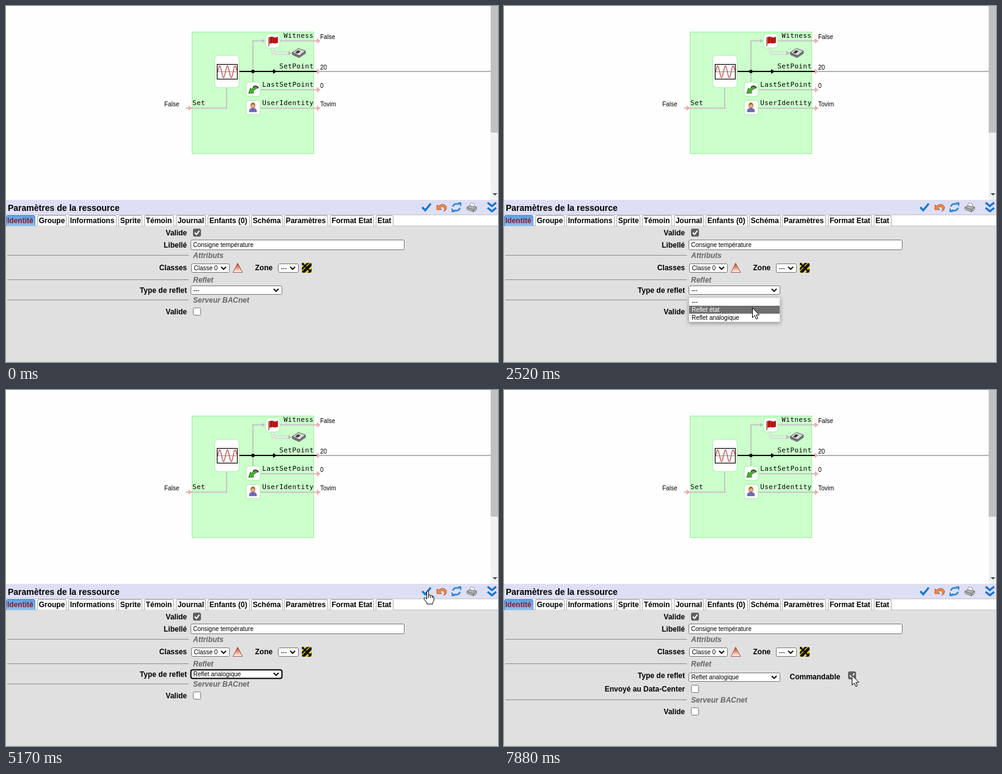
Recreate the animation shown at these times as an HTML page. Size 805 px wide and 582 px high, loop 8000 ms.

```html
<!DOCTYPE html>
<html lang="fr">
<head>
<meta charset="utf-8">
<title>Paramètres de la ressource</title>
<style>
html, body { margin: 0; width: 100%; height: 100%; overflow: hidden; background: #fff; }
svg { display: block; }
text { font: 10px "Liberation Sans", Arial, sans-serif; white-space: pre; }
.b { font-weight: bold; font-size: 12px; }
.i { font-weight: bold; font-style: italic; font-size: 12px; fill: #666; }
.h { font-weight: bold; font-size: 14px; }
.m { font: 11px "DejaVu Sans Mono", monospace; letter-spacing: .38px; }
.wire { fill: none; stroke: #c6c6c6; stroke-width: 2; }
.card { fill: #fff; stroke: #a4f2a4; }
.rule { stroke: #8c8c8c; }
.field { fill: #fff; stroke: #767676; }
.pink { fill: #f4aaa4; }
</style>
</head>
<body>
<svg id="stage" width="805" height="582" viewBox="0 0 805 582">
  <defs>
    <linearGradient id="tab" x2="0" y2="1"><stop stop-color="#5c9fe4"/><stop offset="1" stop-color="#8fc0f0"/></linearGradient>
    <linearGradient id="cone" x2="0" y2="1"><stop stop-color="#e02010"/><stop offset=".4" stop-color="#f08060"/><stop offset="1" stop-color="#fff"/></linearGradient>
    <pattern id="hazard" width="6" height="6" patternUnits="userSpaceOnUse" patternTransform="rotate(45)">
      <rect width="6" height="6" fill="#111"/><rect width="3" height="6" fill="#ffd800"/>
    </pattern>
    <filter id="shade" x="-10%" y="-30%" width="120%" height="170%"><feDropShadow dx="0" dy="2" stdDeviation="3" flood-opacity=".35"/></filter>
  </defs>
  <rect width="805" height="582" fill="#e0e0e0"/>
  <rect width="805" height="317" fill="#fefefe"/>
  <rect x="793" width="12" height="317" fill="#f1f1f1"/>
  <rect x="793" width="12" height="207" fill="#c1c1c1"/>
  <path d="M796 306h8l-4 4z" fill="#505050"/>

  <!-- diagram -->
  <rect x="304.5" y="42.5" width="199" height="199" fill="#ccffcc" stroke="#99f099"/>
  <g class="wire">
    <path d="M404 124V57H420M448 57H510M416 137H510M416 167H510M294 167H361V134"/>
    <path d="M514 107H793" stroke="#b4b4b4"/>
    <path d="M436.500 69V73Q436.500 77 441 77H464" stroke-width="4"/>
    <path d="M436.500 69V73Q436.500 77 441 77H464" stroke="#eefcee" stroke-width="2"/>
  </g>
  <path d="M382 107H509" stroke="#000" stroke-width="2"/>
  <circle cx="404" cy="107" r="2.800"/>
  <path d="M437 103l6 4-6 4z"/>
  <path d="M419 54l5 3-5 3zM462 73.500l6 3.500-6 3.500z" fill="#bbb"/>
  <g class="card">
    <rect x="341.500" y="80.500" width="40" height="53" rx="6"/>
    <rect x="425" y="45.500" width="23" height="23" rx="4"/>
    <rect x="393" y="124.500" width="23" height="23" rx="4"/>
    <rect x="393" y="154.500" width="23" height="23" rx="4"/>
  </g>
  <rect x="345.500" y="95.500" width="33" height="24" fill="#fff" stroke="#000" stroke-width="1.200"/>
  <path d="M346 107.500H378" stroke="#999"/>
  <path id="wave" fill="none" stroke="#b83c3c" stroke-width="1.200"/>
  <path d="M430 51V66" stroke="#806040" stroke-width="1.500"/>
  <path d="M431 51q4-2 7 0t7-1v10q-4 2-7 1t-7 1z" fill="#d01818"/>
  <path d="M434 51v10M438.500 51v10M442 51v9" stroke="#801010"/>
  <path d="M468.500 76l10-6.500 11.500 4-10 8z" fill="#d8d8dc" stroke="#555"/>
  <path d="M468.500 76v3.500l11 5 10.500-7v-4l-10 8z" fill="#777" stroke="#444" stroke-width=".6"/>
  <path d="M473 76l5-3.500 4 1.600-5 3.700z" fill="#333"/>
  <path d="M413 134q-5-6-11 2l-2-2-3 9 9-1-2-2q4-6 9-6z" fill="#48b428" stroke="#1c5c10" stroke-width=".8"/>
  <path d="M413 134q-4-6-9-1" fill="none" stroke="#222" stroke-width="1.600"/>
  <path d="M398 173q0-6 6-6t6 6z" fill="#7068b8" stroke="#48448c" stroke-width=".7"/>
  <circle cx="404" cy="163" r="3.500" fill="#f0b080" stroke="#8c5020" stroke-width=".8"/>
  <path d="M400.500 162q0-4 3.500-4t3.500 4q-3-2-7 0z" fill="#a85c20"/>

  <!-- title bar -->
  <rect y="317" width="805" height="24" fill="#dedff4"/>
  <path d="M681 329l5 5 9-11" fill="none" stroke="#1478d4" stroke-width="3.200"/>
  <path d="M705 325v8h8l-3-3q4-4 7 0 2 3-1 6 6-3 4.500-8-4-7-13-1z" fill="#f08850" stroke="#a84c1c" stroke-width=".8"/>
  <g fill="none" stroke="#2c86d8" stroke-width="2.400"><path d="M731 328q2-6 10-4M743 330q-2 6-10 4"/></g>
  <path d="M739 321h6v7zM735 337h-6v-7z" fill="#2c86d8"/>
  <path d="M758 328l2-6 7 2-1 5z" fill="#fff" stroke="#888" stroke-width=".8"/>
  <path d="M754 329l5-2.500 11 2v4l-5 4-11-4z" fill="#b4b4b8" stroke="#666" stroke-width=".8"/>
  <path d="M754.500 329.500l10 3.500 5-4M765 333v4" fill="none" stroke="#555" stroke-width=".8"/>
  <path d="M788 321.500l7 5.500 7-5.500M788 330l7 5.500 7-5.500" fill="none" stroke="#1b74d2" stroke-width="3.400"/>
  <rect y="341" width="805" height="19" fill="#fff"/>
  <path d="M0 341.500H805M0 359.500H805" stroke="#c4c4c4"/>
  <g id="static"></g>

  <!-- form -->
  <path d="M371.500 435.500l7.500-15 8 15z" fill="url(#cone)" stroke="#7c4030" stroke-width=".8"/>
  <rect x="484" y="420" width="16" height="16" fill="url(#hazard)"/>
  <path d="M485 421l14 14M499 421l-14 14" stroke="#111" stroke-width="2.500"/>
  <path d="M2 407.500H299M2 447.500H299" class="rule"/>
  <g id="short"></g>
  <g id="long"></g>

  <g id="menu">
    <rect x="302.500" y="476.500" width="149" height="40" fill="#fff" stroke="#ccc" filter="url(#shade)"/>
    <rect id="pick" x="303" width="148" height="13" fill="#707070"/>
  </g>
  <circle id="click" r="12" fill="#ff0" fill-opacity=".47"/>
  <g id="cursor" stroke="#000" fill="#fff" stroke-linejoin="round">
    <path id="arrow" d="M.5 .5V16.500L4.200 13 6.700 18.800 9.200 17.700 6.700 12H11.800Z"/>
    <path id="hand" d="M-1.500 14V2Q-1.500 .5 0 .5T1.500 2V8Q2 6.500 3.500 7T4.500 8.500Q5.500 7.300 7 8T7.500 9.500Q10 8.500 10 11V15Q10 18 8 20V22H-1V20Q-4 17 -6 13.500 -6.500 11.500 -4.500 11.500 -3 12 -1.500 14ZM1.500 8v4M4.500 8.500V12M7.500 9.500V12"/>
  </g>
</svg>
<script>
const $ = id => document.getElementById(id);
const NS = 'http://www.w3.org/2000/svg';

function add(parent, tag, attrs, content) {
  const el = document.createElementNS(NS, tag);
  for (const k in attrs) el.setAttribute(k, attrs[k]);
  if (content) el.textContent = content;
  return parent.appendChild(el);
}
const label = (g, x, y, str, cls = '', more = {}) => add(g, 'text', { x, y, class: cls, ...more }, str);
const right = (g, x, y, str, cls = 'b') => label(g, x, y, str, cls, { 'text-anchor': 'end' });
const box = (g, x, y, width, height, more) =>
  add(g, 'rect', { x: x + .5, y: y + .5, width: width - 1, height: height - 1, rx: 2, class: 'field', ...more });

function select(g, x, y, w, str) {
  const frame = box(g, x, y, w, 15);
  const value = label(g, x + 4.5, y + 11, str);
  add(g, 'path', { d: `M${x + w - 14} ${y + 5.5}l4 4 4-4`, fill: 'none', stroke: '#000', 'stroke-width': 1.8 });
  return { frame, value };
}
function check(g, x, y, on) {
  const node = add(g, 'g', {});
  box(node, x, y, 13, 13);
  const mark = add(node, 'g', {});
  box(mark, x, y, 13, 13, { style: 'fill:#616161;stroke:#616161' });
  add(mark, 'path', { d: `M${x + 3} ${y + 6.5}l2.700 3 4.500-6.200`, fill: 'none', stroke: '#fff', 'stroke-width': 2 });
  show(mark, on);
  return mark;
}
function show(el, on) { el.style.display = on ? '' : 'none'; }

const base = $('static');

let wave = '';
for (let x = 0; x <= 31; x += .5) wave += (x ? 'L' : 'M') + (346.5 + x) + ' ' + (107.5 - 9.5 * Math.sin(x * Math.PI / 6.3)).toFixed(2);
$('wave').setAttribute('d', wave);

// diagram ports
[[57, 'Witness', 'False'], [107, 'SetPoint', '20'], [137, 'LastSetPoint', '0'], [167, 'UserIdentity', 'Tovim']].forEach(([y, port, value]) => {
  add(base, 'path', { d: `M508.500 ${y - 4.500}l6 4.500-6 4.500z`, class: 'pink' });
  right(base, 503.4, y - 5, port, 'm');
  label(base, 514, y - 3, value);
});
add(base, 'path', { d: 'M298.500 162.500l6 4.500-6 4.500z', class: 'pink' });
label(base, 305, 162, 'Set', 'm');
label(base, 259, 164, 'False');

// tabs
label(base, 3, 335, 'Paramètres de la ressource', 'h');
[['Identité', 0, 47], ['Groupe', 51, 98], ['Informations', 102, 180], ['Sprite', 184, 222], ['Témoin', 226, 274],
 ['Journal', 278, 326], ['Enfants (0)', 330, 398], ['Schéma', 401, 452], ['Paramètres', 455, 526],
 ['Format Etat', 530, 601], ['Etat', 605, 633]].forEach(([name, a, b], i) => {
  add(base, 'path', { d: `M${a + .5} 359.500V345q0-2.500 2.500-2.500H${b - 2}q2.500 0 2.500 2.500V359.500`,
    fill: i ? '#fff' : 'url(#tab)', stroke: i ? '#a8a8a8' : '#5a86b4' });
  label(base, a + (i ? 2.7 : 2), 355, name, 'b', { fill: i ? '#000' : '#8c1828' });
});

// fixed fields
right(base, 296, 375, 'Valide');
check(base, 306, 364, true);
right(base, 296, 395, 'Libellé');
box(base, 302, 382, 350, 17);
label(base, 306, 394, 'Consigne température');
label(base, 306, 412, 'Attributs', 'i');
right(base, 296, 432, 'Classes');
select(base, 303, 421, 63, 'Classe 0');
label(base, 407.5, 432, 'Zone', 'b');
select(base, 445, 421, 34, '---');
label(base, 306, 452, 'Reflet', 'i');

function bacnet(g, y) {
  add(g, 'path', { d: `M2 ${y - .5}H299`, class: 'rule' });
  label(g, 306, y + 4, 'Serveur BACnet', 'i');
  right(g, 296, y + 23, 'Valide');
  check(g, 306, y + 12, false);
}

const short = $('short'), long = $('long');
right(short, 296, 469, 'Type de reflet');
const kind = select(short, 302, 457, 150, '---');
bacnet(short, 481);

right(long, 296, 471, 'Type de reflet');
select(long, 302, 462, 150, 'Reflet analogique');
label(long, 467.5, 473, 'Commandable', 'b');
const command = check(long, 563, 460, false);
right(long, 296, 493, 'Envoyé au Data-Center');
check(long, 306, 482, false);
bacnet(long, 507);

const options = ['---', 'Reflet état', 'Reflet analogique'].map((s, i) => label($('menu'), 307, 486.5 + 13 * i, s));

// pointer path: time, x, y
const path = [
  [850, 500, 572], [1150, 476, 524], [1580, 438, 464], [1650, 438, 463], [2055, 438, 463], [2510, 406, 493],
  [2900, 398, 509], [3520, 398, 509], [3780, 470, 522], [3980, 470, 522], [4240, 510, 504], [4480, 586, 436],
  [4830, 684, 352], [5090, 690, 328], [5890, 690, 328], [6150, 645, 385], [6550, 577, 463], [6750, 571, 466],
  [6940, 570, 466], [7300, 569, 466], [8000, 569, 466]
];
const presses = [[1650, 1780], [2980, 3170], [5430, 5560], [7810, 7880]];
const STEP = 66.3;

function pointer(t) {
  const q = 850 + Math.floor((t - 850) / STEP + .001) * STEP;
  let i = 1;
  while (i < path.length - 1 && path[i][0] < q) i++;
  const [t0, x0, y0] = path[i - 1], [t1, x1, y1] = path[i];
  const k = Math.min(1, Math.max(0, (q - t0) / (t1 - t0)));
  return [Math.round(x0 + (x1 - x0) * k), Math.round(y0 + (y1 - y0) * k)];
}

function draw(t) {
  const [x, y] = pointer(t);
  const chosen = t >= 3310, saved = t >= 5630, overIcon = y < 338;

  show(short, !saved);
  show(long, saved);
  kind.value.textContent = chosen ? 'Reflet analogique' : '---';
  kind.frame.style.cssText = chosen ? 'stroke:#000;stroke-width:2;rx:3px' : '';
  show(command, t >= 7810);

  show($('menu'), t >= 1710 && !chosen);
  const row = Math.min(2, Math.max(0, Math.floor((y - 477) / 13)));
  $('pick').setAttribute('y', 477 + 13 * row);
  options.forEach((o, i) => o.setAttribute('fill', i === row ? '#fff' : '#000'));

  show($('cursor'), t >= 850);
  $('cursor').setAttribute('transform', `translate(${x} ${y})`);
  show($('arrow'), !overIcon);
  show($('hand'), overIcon);
  show($('click'), presses.some(([a, b]) => t >= a && t < b));
  $('click').setAttribute('cx', x);
  $('click').setAttribute('cy', y);
}

const start = performance.now();
(function tick() {
  draw((performance.now() - start) % 8000);
  requestAnimationFrame(tick);
})();
</script>
</body>
</html>
```
